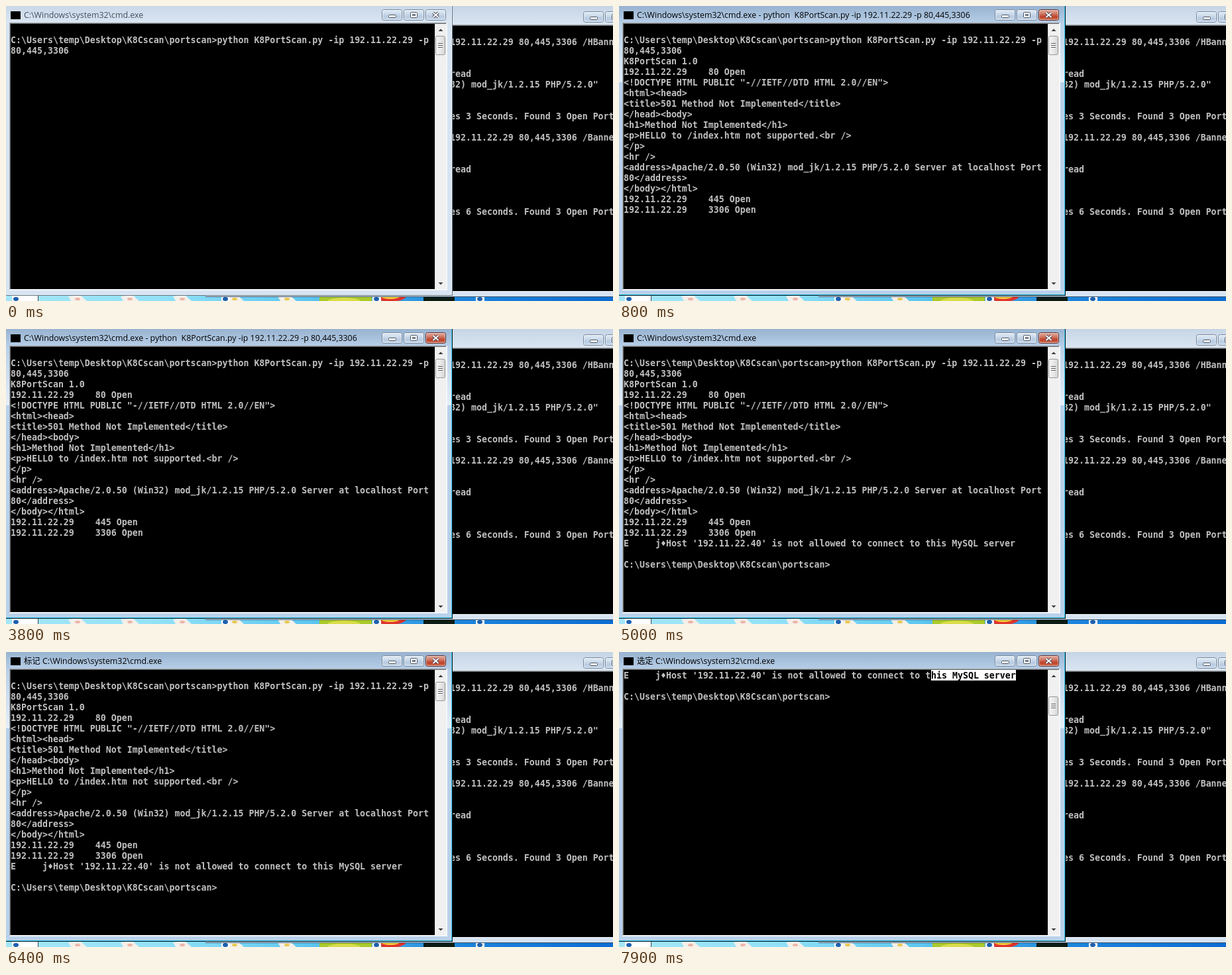
Recreate the animation shown at these times as an HTML page with a canvas. Size 916 by 445 pixels, loop 8000 ms.

```html
<!DOCTYPE html>
<html lang="zh">
<head>
<meta charset="utf-8">
<title>Port scan</title>
<style>
html, body { margin: 0; width: 100%; height: 100%; overflow: hidden; background: #000; }
canvas { display: block; }
</style>
</head>
<body>
<canvas id="stage" width="916" height="445"></canvas>
<script>
const ctx = document.getElementById('stage').getContext('2d');
const LOOP = 8000, COL = 8, ROW = 16, LEFT = 7, TOP = 28;
const MONO = 'bold 13.288px "DejaVu Sans Mono", monospace';
const UI = '12.37px "Open Sans", "Noto Sans CJK SC", "Noto Sans CJK", sans-serif';

const PROMPT = 'C:\\Users\\temp\\Desktop\\K8Cscan\\portscan>';
const HOST = '192.11.22.29';
const EXE = 'C:\\Windows\\system32\\cmd.exe';
const LINES = [
  '',
  PROMPT + 'python K8PortScan.py -ip ' + HOST + ' -p',
  '80,445,3306',
  'K8PortScan 1.0',
  HOST + '    80 Open',
  '<!DOCTYPE HTML PUBLIC "-//IETF//DTD HTML 2.0//EN">',
  '<html><head>',
  '<title>501 Method Not Implemented</title>',
  '</head><body>',
  '<h1>Method Not Implemented</h1>',
  '<p>HELLO to /index.htm not supported.<br />',
  '</p>',
  '<hr />',
  '<address>Apache/2.0.50 (Win32) mod_jk/1.2.15 PHP/5.2.0 Server at localhost Port',
  '80</address>',
  '</body></html>',
  HOST + '    445 Open',
  HOST + '    3306 Open',
  "E     j\u2666Host '192.11.22.40' is not allowed to connect to this MySQL server",
  '',
  PROMPT
];
const BACK_LINES = [
  [0, HOST + ' 80,445,3306 /HBanner'],
  [3, 'read'],
  [4, '32) mod_jk/1.2.15 PHP/5.2.0"'],
  [7, 'es 3 Seconds. Found 3 Open Ports'],
  [9, HOST + ' 80,445,3306 /Banner'],
  [12, 'read'],
  [16, 'es 6 Seconds. Found 3 Open Ports']
];
const MENU = ['标记(K)', '复制(Y)', '粘贴(P)', '全选(S)', '滚动(L)', '查找(F)...'];

// Last value whose start time has passed
const at = (t, first, ...steps) => steps.reduce((v, [start, next]) => t >= start ? next : v, first);

function rect(x, y, w, h, fill) {
  ctx.fillStyle = fill;
  ctx.fillRect(x, y, w, h);
}

function text(str, x, y, font, fill) {
  ctx.font = font;
  ctx.fillStyle = fill;
  ctx.fillText(str, x, y);
}

function fade(x0, y0, x1, y1, ...colors) {
  const g = ctx.createLinearGradient(x0, y0, x1, y1);
  colors.forEach((c, i) => g.addColorStop(i / (colors.length - 1), c));
  return g;
}

function rounded(x, y, w, h, r, fill, stroke) {
  ctx.beginPath();
  ctx.roundRect(x + .5, y + .5, w - 1, h - 1, r);
  ctx.fillStyle = fill;
  ctx.fill();
  ctx.strokeStyle = stroke;
  ctx.lineWidth = 1;
  ctx.stroke();
}

function shape(fill, ...pts) {
  ctx.beginPath();
  pts.forEach(p => ctx.lineTo(...p));
  ctx.fillStyle = fill;
  ctx.fill();
}

function disc(x, y, rx, ry, fill) {
  ctx.beginPath();
  ctx.ellipse(x, y, rx, ry, 0, 0, Math.PI * 2);
  ctx.fillStyle = fill;
  ctx.fill();
}

function clipped(x, y, w, h, draw) {
  ctx.save();
  ctx.beginPath();
  ctx.rect(x, y, w, h);
  ctx.clip();
  draw();
  ctx.restore();
}

function desktop() {
  rect(0, 436, 916, 9, fade(0, 0, 916, 0, '#a4e6f8', '#92e2f8', '#5cc6f0', '#1c84dc', '#0c6cd2'));
  rect(9, 437, 40, 8, '#fff');
  rect(48, 437, 1, 8, '#3c4854');
  for (let i = 0; i < 5; i++) {
    const x = 94 + i * 79;
    shape('#f4f0ea', [x, 438], [x + 18, 436], [x + 28, 445], [x + 4, 445]);
    disc(x + 14, 442, 4, 2, i < 3 ? '#eeb4a8' : '#e8c84c');
  }
  rect(473, 437, 79, 8, '#a9c92c');
  disc(510, 446, 26, 6, '#d8dc4a');
  disc(580, 437, 24, 9, '#e0342c');
  disc(580, 438, 14, 4, '#f6d23a');
  rect(630, 437, 47, 8, '#0c1c14');
  for (const x of [9, 325, 553, 709]) {
    rect(x, 437, 13, 8, '#fff');
    disc(x + 6, 442, 4, 3, '#1c5fae');
  }
}

function button(x, y, kind, hot) {
  const fill = hot
    ? fade(0, y, 0, y + 17, '#e5b0a2', '#d58370', '#bc4028', '#d47a5c')
    : fade(0, y, 0, y + 17, '#e6eef7', '#d0deed', '#b7cae0', '#cfdff0');
  rounded(x, y, 31, 17, 3, fill, hot ? '#5c2a28' : '#75879c');
  rounded(x + 1, y + 1, 29, 15, 2, 'transparent', 'rgba(255,255,255,.5)');
  if (kind === 'min') rounded(x + 10, y + 8, 12, 5, 1, '#fff', '#4a5462');
  if (kind === 'max') {
    rounded(x + 10, y + 4, 11, 9, 1, '#fff', '#4a5462');
    rounded(x + 13, y + 7, 5, 3, 0, '#b7cae0', '#4a5462');
  }
  if (kind === 'close') {
    for (const [color, width] of [['#4a4650', 4], ['#fff', 2]]) {
      ctx.strokeStyle = color;
      ctx.lineWidth = width;
      ctx.beginPath();
      ctx.moveTo(x + 11.5, y + 5);
      ctx.lineTo(x + 19.5, y + 12);
      ctx.moveTo(x + 19.5, y + 5);
      ctx.lineTo(x + 11.5, y + 12);
      ctx.stroke();
    }
  }
}

function backWindow() {
  rect(301, 0, 615, 439, '#d7e4f2');
  rect(301, 0, 615, 28, fade(0, 0, 0, 28, '#c6d5e6', '#dae5f1'));
  rect(301, 28, 615, 1, '#a0a8b0');
  rect(301, 29, 615, 1, '#696969');
  rect(301, 30, 615, 400, '#000');
  rect(301, 430, 615, 1, '#f4f7fa');
  rect(301, 438, 615, 1, '#46586c');
  button(871, 8, 'min');
  button(904, 8, 'max');
  clipped(674, 30, 242, 400, () => {
    for (const [row, str] of BACK_LINES) text(str, 670, 59 + row * ROW, MONO, '#c0c0c0');
  });
}

function scrollbar(scroll, hover) {
  rect(647, 27, 17, 400, '#f0f0f0');
  rect(647, 27, 1, 400, '#e3e3e3');
  const face = fade(648, 0, 664, 0, '#f6f6f6', '#e8e8e8', '#cfcfcf');
  ctx.globalAlpha = hover;
  rounded(648, 28, 15, 16, 2, face, '#979797');
  rounded(648, 410, 15, 16, 2, face, '#979797');
  ctx.globalAlpha = 1;
  shape('#3c3c3c', [652.5, 38], [656, 34.5], [659.5, 38]);
  shape('#3c3c3c', [652.5, 417], [656, 420.5], [659.5, 417]);
  const y = 45 + Math.round(scroll * 1.22);
  rounded(648, y, 15, 29, 2, face, '#979797');
  for (let i = 0; i < 3; i++) {
    rect(652, y + 11 + i * 3, 7, 1, '#55585c');
    rect(652, y + 12 + i * 3, 7, 1, '#fff');
  }
}

function frame(active, title) {
  const base = active ? '#b9d1ea' : '#d7e4f2';
  const edge = active ? '#31d2f5' : '#eaf2fa';
  const rim = active ? '#0c1218' : '#66727e';
  rect(0, 0, 674, 437, base);
  if (active) {
    const side = fade(0, 26, 0, 115, '#b9d0e8', '#e6eff9');
    rect(0, 26, 5, 89, side);
    rect(666, 26, 7, 89, side);
  }
  rect(0, 0, 674, 26, active
    ? fade(0, 0, 0, 26, '#98b3d0', '#b7cee7')
    : fade(0, 0, 0, 26, '#c9d8e8', '#dbe6f2'));
  rect(672, 0, 1, 436, edge);
  rect(673, 0, 1, 437, rim);
  rect(0, 435, 673, 1, edge);
  rect(0, 436, 674, 1, rim);
  rect(5, 25, 661, 404, '#f4f7fa');
  rect(5, 25, 660, 1, '#a0a8b0');
  rect(5, 25, 1, 403, '#a0a8b0');
  rect(6, 26, 658, 1, '#696969');
  rect(6, 26, 1, 401, '#696969');
  rect(7, 8, 15, 12, '#000');
  text(title, 27, 18, UI, active ? '#000' : '#44505c');
  button(567, 5, 'min');
  button(600, 5, 'max');
  button(633, 5, 'close', active);
}

function shellText(count, scroll, cursor, picked) {
  rect(LEFT, 27, 640, 400, '#000');
  clipped(LEFT, 27, 640, 400, () => {
    const y = row => TOP + (row - scroll) * ROW;
    LINES.slice(0, count).forEach((str, row) => text(str, LEFT, y(row) + 12, MONO, '#c0c0c0'));
    if (picked) {
      const row = 18, start = 74 - picked;
      const x = LEFT + start * COL;
      rect(x, y(row) - 1, picked * COL, ROW, '#fff');
      text(LINES[row].slice(start), x, y(row) + 12, MONO, '#000');
    }
    if (cursor) rect(LEFT + cursor[0] * COL, y(cursor[1]) + 11, COL, 4, '#c0c0c0');
  });
}

function menu() {
  const x = 422, y = 317;
  rect(x + 4, y + 4, 163, 138, 'rgba(0,0,0,.3)');
  rect(x, y, 163, 138, '#979797');
  rect(x + 1, y + 1, 161, 136, '#f1f1f1');
  rect(x + 29, y + 3, 1, 132, '#e0e0e0');
  MENU.forEach((str, i) => {
    const ink = i === 1 ? '#9a9a9a' : '#000';
    text(str, x + 34, y + 19 + i * 22, UI, ink);
    if (i === 1) text('Enter', x + 118, y + 19 + i * 22, UI, ink);
  });
}

function draw(t) {
  const title = at(t, EXE,
    [700, EXE + ' - python  K8PortScan.py -ip ' + HOST + ' -p 80,445,3306'],
    [4900, EXE], [6400, '标记 ' + EXE], [6700, '选定 ' + EXE]);
  const count = at(t, 3, [700, 4], [800, 18], [4800, 19], [4900, 21]);
  const scroll = at(t, 0, [7000, 12], [7100, 24], [7900, 18]);
  const hover = at(t, 0, [4300, .5], [4600, 1], [4900, .5], [5000, 0],
    [7000, .5], [7100, .85], [7200, 1], [7400, .65], [7500, .3], [7700, 0]);
  const wait = [0, 18];
  const cursor = at(t, false, [1400, wait], [1900, false], [2400, wait], [2900, false],
    [3400, wait], [3800, false], [4200, wait], [4800, false], [5800, [39, 20]], [6300, false]);
  const picked = at(t, 0, [6700, 8], [6800, 16]);

  desktop();
  backWindow();
  frame(t >= 400, title);
  shellText(count, scroll, cursor, picked);
  scrollbar(scroll, hover);
  if (t >= 6100 && t < 6300) menu();
}

const begin = performance.now();
function tick() {
  draw((performance.now() - begin) % LOOP);
  requestAnimationFrame(tick);
}
tick();
</script>
</body>
</html>
```
